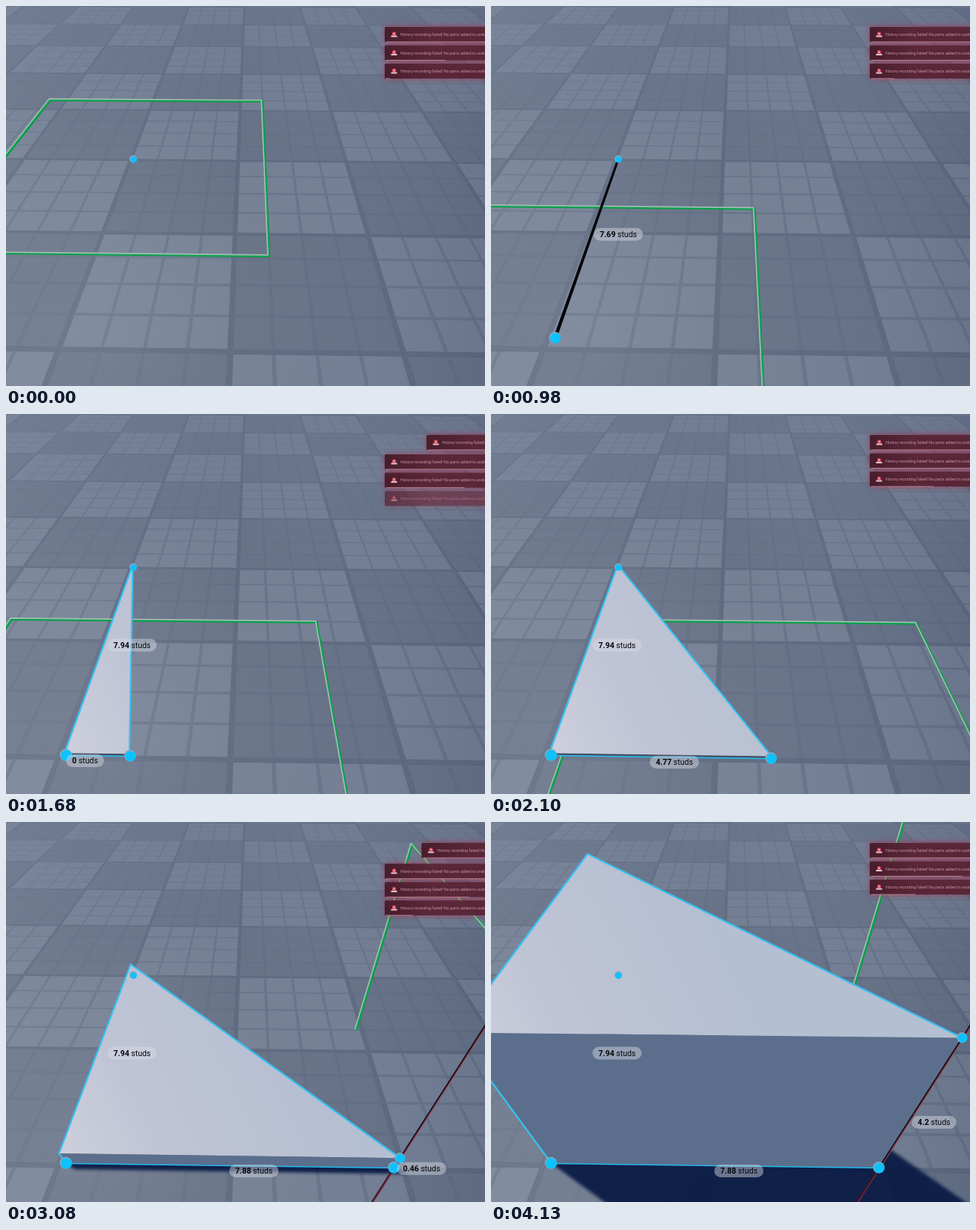
An HTML page with a canvas that plays this animation: 640 by 508 pixels, repeating every 4200 ms.

```html
<!DOCTYPE html>
<html lang="en">
<head>
<meta charset="utf-8">
<title>Triangle extrusion</title>
<style>
html, body { margin: 0; width: 100%; height: 100%; overflow: hidden; background: #667286; }
canvas { display: block; width: 100vw; height: 100vh; }
</style>
</head>
<body>
<canvas id="stage" width="640" height="508"></canvas>
<script>
const W = 640, H = 508, LOOP = 4200, STEP = 70;
const canvas = document.getElementById('stage');
const ctx = canvas.getContext('2d');

// Camera: u runs right, v runs away (floor tiles), h runs up (studs).
const depth = (v, h = 0) => 1 + .301 * v - .0845 * h;
function project([u, v, h = 0]) {
  const w = depth(v, h);
  return [316 + (228 * u - 19) / w, -216.6 + (678.6 - 84 * h) / w];
}
// The floor grid is turned slightly against the camera.
const turn = (a, b) => [a + .015 * b, b - .015 * a];

function trace(c, points, close) {
  c.beginPath();
  points.forEach(([x, y], i) => i ? c.lineTo(x, y) : c.moveTo(x, y));
  if (close) c.closePath();
}
function fill(c, points, color) {
  trace(c, points, true);
  c.fillStyle = color;
  c.fill();
}
function stroke(points, color, width) {
  trace(ctx, points);
  ctx.strokeStyle = color;
  ctx.lineWidth = width;
  ctx.stroke();
}
const shift = (points, dx, dy) => points.map(([x, y]) => [x + dx, y + dy]);

function makeFloor() {
  const layer = document.createElement('canvas');
  layer.width = W;
  layer.height = H;
  const c = layer.getContext('2d');
  const place = ([a, b]) => project(turn(1.012 * a + .012, b));
  const quad = (a0, b0, a1, b1, color) =>
    fill(c, [[a0, b0], [a1, b0], [a1, b1], [a0, b1]].map(place), color);

  c.fillStyle = '#5f6b80';
  c.fillRect(0, 0, W, H);
  for (let b = -1; b < 9; b++) {
    for (let a = -6; a < 6; a++) {
      const light = (a + b) & 1;
      quad(a, b, a + 1, b + 1, light ? '#747f93' : '#667185');
      const seam = light ? '#667287' : '#606c81';
      for (let i = 1; i < 4; i++) {
        const s = i / 4, r = .011;
        quad(a + s - r, b, a + s + r, b + 1, seam);
        quad(a, b + s - r, a + 1, b + s + r, seam);
      }
    }
  }
  for (let i = -6; i < 10; i++) {
    quad(i - .018, -1, i + .018, 9, '#5c687d');
    quad(-6, i - .018, 6, i + .018, '#5c687d');
  }

  const wash = (gradient, ...stops) => {
    stops.forEach(([at, color]) => gradient.addColorStop(at, color));
    c.fillStyle = gradient;
    c.fillRect(0, 0, W, H);
  };
  wash(c.createLinearGradient(0, 0, 0, 240),
    [0, 'rgba(107,120,143,.4)'], [1, 'rgba(107,120,143,0)']);
  wash(c.createLinearGradient(0, 0, W, 0),
    [0, 'rgba(200,208,225,.10)'], [.5, 'rgba(160,175,205,.02)'], [1, 'rgba(62,78,108,.20)']);
  wash(c.createRadialGradient(130, 430, 10, 130, 430, 300),
    [0, 'rgba(215,215,222,.10)'], [1, 'rgba(215,215,222,0)']);
  return layer;
}
const floor = makeFloor();

// Keys are [time, value, value...], joined by straight lines.
function track(keys, t) {
  let i = 1;
  while (i < keys.length - 1 && keys[i][0] < t) i++;
  const a = keys[i - 1], b = keys[i];
  const k = Math.min(1, Math.max(0, (t - a[0]) / (b[0] - a[0])));
  return a.slice(1).map((x, j) => x + (b[j + 1] - x) * k);
}
const A = [-.947, 2.03], B = [-.96, .03];
const SECOND = 1610, EXTRUDE = 2870;
const cursorKeys = [
  [0, ...A], [140, -.947, 1.98], [350, -.95, 1.5], [560, -.952, .95],
  [770, -.955, .38], [980, -.955, .093], [1190, ...B], [1610, ...B],
  [1680, -.579, .025], [1960, .08, .012], [2240, .6, .005],
  [2450, .87, 0], [2590, .964, 0], [2660, .964, 0], [2800, .971, 0]
];
const heightKeys = [
  [2870, .07], [2940, .14], [3080, .46], [3220, 1.1], [3360, 2.05], [3430, 2.77],
  [3640, 3.9], [3850, 4.8], [3920, 4.92], [3990, 4.82], [4060, 4.5], [4130, 4.2]
];
const studs = (p, q) => Math.hypot(4.08 * (q[0] - p[0]), 3.97 * (q[1] - p[1]));
const middle = (p, q) => [(p[0] + q[0]) / 2, (p[1] + q[1]) / 2];

function disc(x, y, r, color) {
  ctx.beginPath();
  ctx.arc(x, y, r, 0, 7);
  ctx.fillStyle = color;
  ctx.fill();
}
function ball(p, r) {
  const [x, y] = project(p);
  disc(x - .3, y - .2, r, '#86a9c0');
  disc(x + .4, y + .6, r - .8, '#0cc2ff');
}

function label(p, value) {
  const [x, y] = project(p);
  const number = String(+value.toFixed(2));
  const bold = '700 10.5px Roboto, Arial, sans-serif', plain = '400 10.5px Roboto, Arial, sans-serif';
  ctx.font = plain;
  const unit = ctx.measureText(' studs').width;
  ctx.font = bold;
  const size = ctx.measureText(number).width;
  ctx.fillStyle = 'rgba(215,219,226,.46)';
  ctx.beginPath();
  ctx.roundRect(x, y - 1, size + unit + 16, 17, 8.5);
  ctx.fill();
  ctx.fillStyle = '#06080c';
  ctx.textBaseline = 'alphabetic';
  ctx.fillText(number, x + 8, y + 11.4);
  ctx.font = plain;
  ctx.fillText(' studs', x + 8 + size, y + 11.4);
}

// A green bar lit from the upper left.
function tube(points) {
  const flat = points.map(project);
  stroke(shift(flat, .9, .8), '#0b9f4a', 3.4);
  stroke(shift(flat, -.5, -.6), '#a3bdb6', 1.7);
}

const HALF = 1.235;
function guide([u, v], h, upright) {
  const at = (a, b, z = 0) => {
    const [x, y] = turn(a, b);
    return [u + x, v + y, z];
  };
  if (upright) {
    const top = h + 4.94;
    // The near end stops short of the camera plane.
    const near = Math.max(-HALF, (.08 + .0845 * top - 1) / .301 - v);
    if (near < HALF) tube([at(0, HALF), at(0, HALF, top), at(0, near, top)]);
  } else {
    const near = Math.max(-HALF, -1.5 - v);
    tube([at(-HALF, near), at(-HALF, HALF), at(HALF, HALF), at(HALF, near), at(-HALF, near)]);
  }
}

function shadow(C, h) {
  const cast = ([u, v]) => [u + .137 * h, v - .09 * h];
  ctx.filter = 'blur(2px)';
  fill(ctx, [A, cast(A), cast(C), cast(B), B].map(project), 'rgba(10,27,68,.94)');
  ctx.filter = 'none';
}

function prism(C, h) {
  const [p2, p3] = [B, C].map(project);
  const [t1, t2, t3] = [A, B, C].map(p => project([...p, h]));
  const top = ctx.createLinearGradient(t2[0], t2[1], t2[0] + 330, t2[1] - 160);
  top.addColorStop(0, '#cdcfdb');
  top.addColorStop(.35, '#bfc4d5');
  top.addColorStop(1, '#b5bfd2');
  fill(ctx, [p2, p3, t3, t2], h < .12 ? '#465064' : '#5b6f8c');
  fill(ctx, [t1, t3, t2], top);
  stroke([p2, t2, t1, t3], '#38c2f3', 2.2);
  stroke(shift([p2, p3], 0, .6), '#27bdf2', 1.5);
}

function axis([u, v]) {
  const [low, base, high] = [-2.6, 0, 4.9].map(h => project([u, v, h]));
  stroke([low, base], '#3a1524', 2);
  stroke([base, high], '#10101a', 2);
  stroke(shift([low, base], 1.3, .8), '#822a38', 1.2);
  stroke(shift([base, high], 1.3, .8), '#a83c46', 1.2);
}

// Each notice: [appears, expires].
const notices = [
  [-6000, 100], [-3400, 1610], [-1200, 3810],
  [330, 5330], [1610, 6610], [3000, 8010]
];
const settle = age => age < 0 ? 0 : 1 - Math.exp(-age / 80) * Math.cos(age / 41);

function notice(x, y, left) {
  ctx.shadowColor = 'rgba(175,35,65,.75)';
  ctx.shadowBlur = 9;
  ctx.fillStyle = 'rgba(84,36,52,.9)';
  ctx.beginPath();
  ctx.roundRect(x, y - 10, 280, 20, 2.5);
  ctx.fill();
  ctx.shadowBlur = 0;
  const shade = ctx.createLinearGradient(x, 0, x + 60, 0);
  shade.addColorStop(0, 'rgba(45,14,28,.4)');
  shade.addColorStop(1, 'rgba(45,14,28,0)');
  ctx.fillStyle = shade;
  ctx.fillRect(x, y - 10, 60, 20);

  ctx.fillStyle = '#df5264';
  ctx.beginPath();
  ctx.roundRect(x + 10, y - 3.5, 5, 5, [2.5, 2.5, 0, 0]);
  ctx.fill();
  ctx.fillStyle = '#e6c3ca';
  ctx.fillRect(x + 8.5, y + 1.5, 8, 2);
  ctx.fillRect(x + 12, y - 2, 1, 2.5);

  ctx.font = '400 5.35px Roboto, Arial, sans-serif';
  ctx.textBaseline = 'middle';
  ctx.fillStyle = '#c896a3';
  ctx.fillText('History recording failed! No parts added to undo stack', x + 21, y + .5);
  ctx.fillStyle = '#c07f8f';
  ctx.fillRect(x + 2, y + 9.5, Math.max(0, left * .049), 1);
}

function drawNotices(t) {
  notices.forEach(([start, end], i) => {
    if (t < start) return;
    const fade = t > end ? 1 - (t - end) / 150 : 1;
    if (fade <= 0) return;
    const slot = notices.slice(i + 1).reduce((sum, n) => sum + settle(t - n[0]), 0);
    ctx.globalAlpha = fade;
    notice(506 + 134 * Math.exp(-(t - start) / 80), 38 + 24.5 * slot, end - t);
    ctx.globalAlpha = 1;
  });
}

function draw(t) {
  const C = track(cursorKeys, t);
  const solid = t >= SECOND, raised = t >= EXTRUDE;
  const h = raised ? track(heightKeys, t)[0] : .1;
  ctx.lineJoin = 'round';
  ctx.drawImage(floor, 0, 0);
  if (raised) shadow(C, h);
  guide(C, h, raised);

  if (solid) {
    prism(C, h);
    if (raised) axis(C);
    ball(B, 8);
    ball(C, 7.7);
    if (raised) ball([...C, h], 7);
  } else if (studs(A, C) > .1) {
    const [a, c] = [A, C].map(project);
    const r = 2.5 / depth(C[1]);
    fill(ctx, [[a[0] - 1.6, a[1]], [a[0] + 1.6, a[1]], [c[0] + r, c[1]], [c[0] - r, c[1]]], '#06070c');
    ball(C, 8 / depth(C[1]));
  }
  ball(A, 5);

  const end = solid ? B : C;
  if (studs(A, end) > .1) label(middle(A, end), studs(A, end));
  if (solid) {
    // The base reading trails the pointer by one step.
    const late = track(cursorKeys, t - STEP);
    label(middle(B, late), studs(B, late));
  }
  if (raised) label([...C, h / 2], h);
  drawNotices(t);
}

const begin = performance.now();
function tick() {
  const t = (performance.now() - begin) % LOOP;
  draw(Math.floor(t / STEP) * STEP);
  requestAnimationFrame(tick);
}
tick();
</script>
</body>
</html>
```
